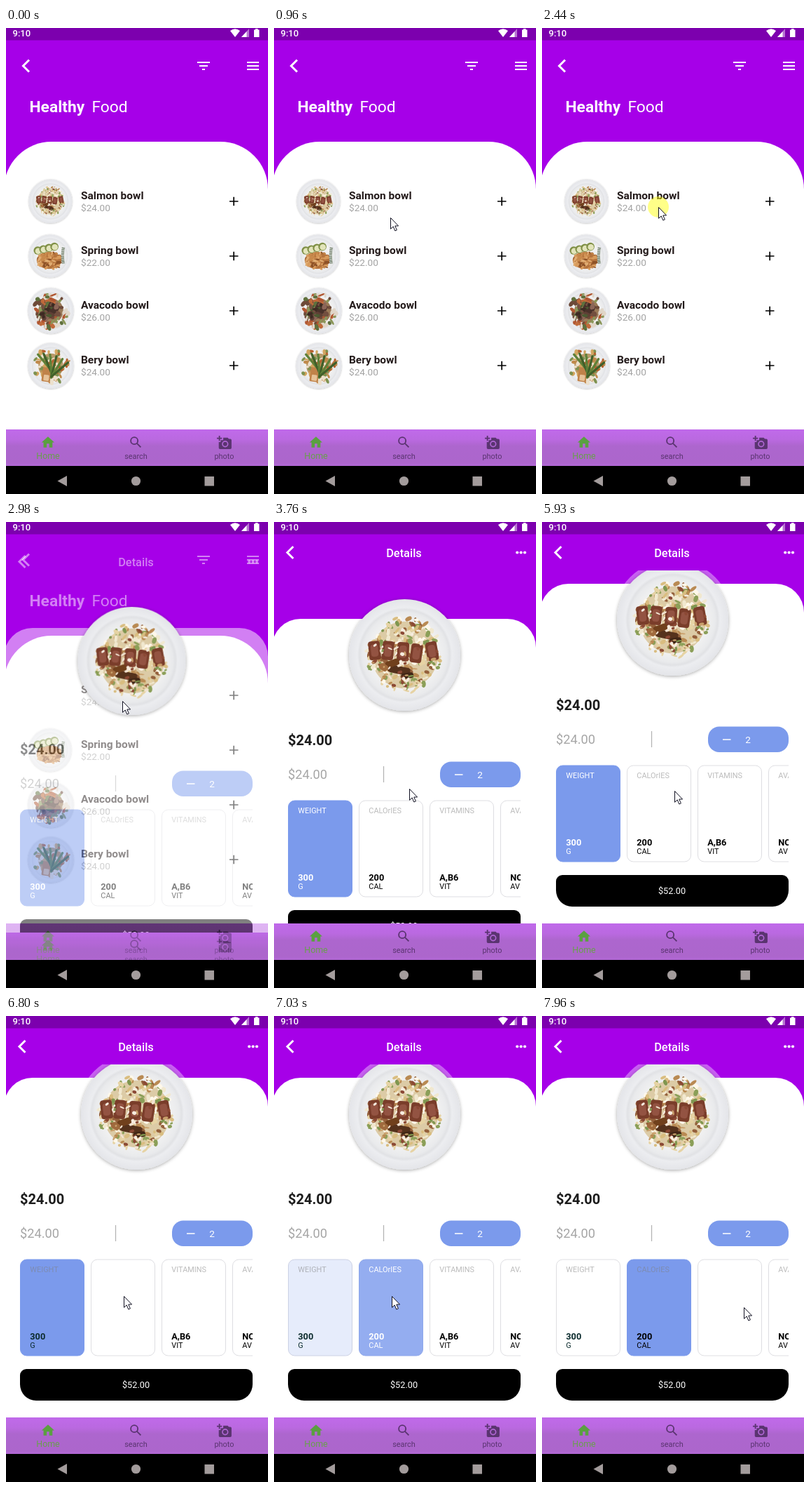
An HTML page that plays this animation: 374 px wide and 664 px high, repeating every 8 s.

```html
<!DOCTYPE html>
<html lang="en">
<head>
<meta charset="utf-8">
<title>Food menu</title>
<style>
html, body { margin: 0; width: 100%; height: 100%; overflow: hidden; background: #a600e8 }
svg { display: block; width: 100vw; height: 100vh; font-family: Roboto, sans-serif }
.line { fill: none; stroke: currentColor; stroke-width: 2 }
.thick { stroke-width: 3 }
.thin { stroke-width: 1.7 }
.bold { font-weight: 700 }
.medium { font-weight: 500 }
.mid { text-anchor: middle }
.white { fill: #fff; color: #fff }
.card { fill: #80808088; color: #000; font-size: 10.92px }
.card .val { fill: currentColor }
.box { fill: #fff; stroke: #dedee2 }

#details, #thumb0, #hero, #halo, .card, #tap { animation: 8s step-end infinite }
#details { animation-name: enter }
#thumb0 { animation-name: leave }
#hero { animation-name: fly }
#halo { animation-name: halo }
.scroll { animation: scroll 8s linear infinite }
#card0 { animation-name: ink0 }
#card1 { animation-name: ink1 }
#card2 { animation-name: ink2 }
#card0 .box { animation: fade0 8s linear infinite }
#card1 .box { animation: fade1 8s linear infinite }
#cursor { animation: point 8s linear infinite }
#tap { animation-name: tap }

@keyframes enter {
  0% { opacity: 0; transform: translateY(13px) }
  37.25% { opacity: .5; transform: translateY(13px) }
  38.375% { opacity: .93; transform: translateY(1px) }
  39.375%, 100% { opacity: 1; transform: none }
}
@keyframes leave { 0% { opacity: 1 } 37.25%, 100% { opacity: 0 } }
@keyframes fly {
  0% { opacity: 0; transform: translate(-7px, 8.5px) scale(.97) }
  37.25% { opacity: 1; transform: translate(-7px, 8.5px) scale(.97) }
  38.375% { opacity: 1; transform: translate(-.5px, .6px) }
  39.375%, 100% { opacity: 1; transform: none }
}
@keyframes halo { 0% { opacity: 0 } 52.75%, 100% { opacity: .38 } }
@keyframes scroll {
  0% { transform: none }
  52.75% { transform: none; animation-timing-function: steps(3, jump-start) }
  55.5625%, 100% { transform: translateY(-50px) }
}
@keyframes ink0 {
  0% { fill: #fff; color: #fff }
  84%, 100% { fill: #80808088; color: #0c2c2e }
}
@keyframes ink1 {
  0%, 97.75%, 100% { fill: #80808088; color: #000 }
  84% { fill: #fff; color: #fff }
}
@keyframes ink2 {
  0% { fill: #80808088; color: #000 }
  97.75%, 100% { fill: #fff; color: #fff }
}
@keyframes fade0 {
  0%, 85.75% { fill: #7b9aec; stroke: #7b9aec }
  88.375%, 100% { fill: #fff; stroke: #dedee2 }
}
@keyframes fade1 {
  0%, 85.75% { fill: #fff; stroke: #dedee2 }
  88.375%, 100% { fill: #7b9aec; stroke: #7b9aec }
}
@keyframes point {
  0%, 2.99% { opacity: 0; transform: translate(255px, 478px) }
  3% { opacity: 1; transform: translate(255px, 478px); animation-timing-function: steps(10, jump-none) }
  13% { transform: translate(166px, 270px) }
  24.75% { transform: translate(166px, 270px); animation-timing-function: steps(3, jump-start) }
  27.75% { transform: translate(166px, 255px) }
  46% { transform: translate(166px, 255px); animation-timing-function: steps(2, jump-start) }
  48% { transform: translate(193px, 380px); animation-timing-function: step-end }
  74.125% { transform: translate(189px, 383px); animation-timing-function: step-end }
  75.125% { transform: translate(181px, 389px); animation-timing-function: step-end }
  76.125% { transform: translate(173px, 395px); animation-timing-function: step-end }
  77.125% { transform: translate(168px, 399px) }
  89% { transform: translate(168px, 399px); animation-timing-function: steps(5, jump-start) }
  93.6875%, 100% { opacity: 1; transform: translate(288px, 415px) }
}
@keyframes tap {
  0%, 32.5%, 82.125%, 97.75%, 100% { opacity: 0 }
  30.5%, 79.25%, 95.625% { opacity: .47 }
}
</style>
</head>
<body>
<svg viewBox="0 0 374 664" preserveAspectRatio="none">
  <defs>
    <linearGradient id="barFill" x2="0" y2="1">
      <stop stop-color="#c06aea"/><stop offset=".28" stop-color="#ba69e0"/>
      <stop offset=".45" stop-color="#ad66ce"/><stop offset=".9" stop-color="#ac66cc"/>
      <stop offset="1" stop-color="#b268d6"/>
    </linearGradient>
    <radialGradient id="china">
      <stop offset=".6" stop-color="#f1f1f1"/><stop offset=".76" stop-color="#e9eaec"/>
      <stop offset=".81" stop-color="#e1e2e5"/><stop offset=".85" stop-color="#ecedf0"/>
      <stop offset="1" stop-color="#e4e5e9"/>
    </radialGradient>
    <filter id="shade" x="-20%" y="-20%" width="140%" height="140%">
      <feDropShadow dx="0" dy="1" stdDeviation="2.5" flood-opacity=".35"/>
    </filter>
    <filter id="soft" x="-20%" y="-20%" width="140%" height="140%">
      <feDropShadow dx="0" dy=".4" stdDeviation=".8" flood-opacity=".3"/>
    </filter>
    <clipPath id="view"><path d="M0 69H374V572H0z"/></clipPath>
    <clipPath id="strip"><path d="M0 380H352V545H0z"/></clipPath>
    <g id="bar">
      <path d="M0 572H374V624H0z" fill="url(#barFill)"/>
      <path d="M10 20v-6h4v6h5v-8h3L12 3 2 12h3v8z" transform="translate(49 579.5) scale(.91)" fill="#5aa040"/>
      <text x="60" y="613.5" class="mid" font-size="12.4" fill="#69a04c">Home</text>
      <g fill="#5a3470" color="#5a3470" font-size="10.92" class="mid">
        <g class="line" transform="translate(174.5 579.5) scale(.91)">
          <circle cx="9.5" cy="9.5" r="5.5"/><path d="M13.6 13.6 19.7 19.7"/>
        </g>
        <g transform="translate(301 580) scale(.91)">
          <path d="M3 4V1h2v3h3v2H5v3H3V6H0V4zM10 4h7l1.8 2H21a2 2 0 0 1 2 2v12a2 2 0 0 1-2 2H5a2 2 0 0 1-2-2V11h3V8h4z"/>
          <circle cx="13" cy="14" r="4.2" fill="none" stroke="#b267d6" stroke-width="1.8"/>
        </g>
        <text x="185.5" y="613.5">search</text><text x="311.5" y="613.5">photo</text>
      </g>
    </g>
  </defs>

  <g id="list">
    <path d="M0 0H374V664H0z" fill="#a600e8"/>
    <g class="white">
      <path class="line thick" d="M33 45.5 24.5 54 33 62.5"/>
      <path class="line" d="M273 49h18M276 54h12M280 59h4M344 49h17M344 54h17M344 59h17"/>
      <g font-size="22.8">
        <text x="33.5" y="120" class="bold">Healthy</text><text x="122.5" y="120">Food</text>
      </g>
    </g>
    <path d="M-3 664V230a68 68 0 0 1 68-68H306a68 68 0 0 1 68 68V664z" fill="#fff"/>
    <g id="rows"></g>
    <use href="#bar"/>
  </g>

  <g id="details">
    <path d="M0 0H374V664H0z" fill="#a600e8"/>
    <g class="white">
      <path class="line thick" d="M27.5 35 19 43.5 27.5 52"/>
      <text x="185.5" y="49.5" font-size="16.4" class="mid medium">Details</text>
      <circle cx="347.2" cy="43.5" r="2.1"/><circle cx="352.6" cy="43.5" r="2.1"/><circle cx="358" cy="43.5" r="2.1"/>
    </g>
    <g clip-path="url(#view)">
      <g class="scroll">
        <path d="M-3 700V179a41 41 0 0 1 41-41H333a41 41 0 0 1 41 41V700z" fill="#fff"/>
        <text x="20" y="317.5" font-size="20" class="bold" fill="#1c1c1c">$24.00</text>
        <text x="20" y="366" font-size="18.2" fill="#a6a6a6">$24.00</text>
        <path d="M156.5 348V371" stroke="#b4b4b4" stroke-width="1.3"/>
        <rect x="237" y="341.5" width="115" height="36.5" rx="16" fill="#7b9aec"/>
        <path d="M258 360h11.5" stroke="#fff" stroke-width="1.5"/>
        <text x="294" y="364.5" font-size="13.65" class="mid white">2</text>
        <g id="cards" clip-path="url(#strip)"></g>
        <path d="M29 553H343a9 9 0 0 1 9 9v13a23 23 0 0 1-23 23H43a23 23 0 0 1-23-23v-13a9 9 0 0 1 9-9z"/>
        <text x="185.5" y="580" font-size="12.74" class="mid white">$52.00</text>
      </g>
    </g>
    <use href="#bar"/>
  </g>

  <g clip-path="url(#view)">
    <g class="scroll">
      <circle id="halo" cx="186.5" cy="189.5" r="86" fill="#fff"/>
      <g id="hero" style="transform-origin:186.5px 189.5px"></g>
    </g>
  </g>

  <path d="M0 0H374V17.5H0z" fill="#7c00ae"/>
  <g class="white">
    <text x="9.5" y="11.7" font-size="13" class="medium">9:10</text>
    <path d="M320 4Q327-1.5 334 4L327 13z"/>
    <path d="M347 1V13H336z" opacity=".45"/><path d="M343.5 5V13H336z"/>
    <path d="M354 2.5h2V1h3.5v1.5h2V13H354z"/>
  </g>
  <path d="M0 624H374V664H0z"/>
  <g fill="#a39c9c">
    <path d="M73.5 645.5 87 638V653z"/><circle cx="185.5" cy="645.5" r="6.6"/>
    <path d="M283.5 639H297V652.5H283.5z"/>
  </g>

  <g id="cursor">
    <circle id="tap" r="15" fill="#ff0"/>
    <path d="M.5 .5V16.3L4.2 12.9 6.8 19 9.4 17.9 6.8 12H11.6z" fill="#fff" stroke="#111122"/>
  </g>
</svg>
<script>
const $ = id => document.getElementById(id);

function random(seed) {
  return () => (seed = seed * 16807 % 2147483647) / 2147483647;
}

// Seeded crumbs inside a disc.
function crumbs(seed, count, colours, size, scale = 1) {
  const rnd = random(seed * 7919);
  let out = '';
  for (let i = 0; i < count; i++) {
    const a = rnd() * 6.283, d = Math.sqrt(rnd()) * size * 1.04;
    const w = (.03 + rnd() * .06) * scale, h = (.02 + rnd() * .035) * scale;
    out += `<ellipse rx="${w}" ry="${h}" fill="${colours[i % colours.length]}" transform="translate(${d * Math.cos(a)} ${d * Math.sin(a)}) rotate(${rnd() * 180})"/>`;
  }
  return out;
}

const dish = (x, y, r, food) =>
  `<g transform="translate(${x} ${y}) scale(${r})"><circle r="1" fill="url(#china)"/>${food}</g>`;

const slab = (x, y, w, h, turn, fill) =>
  `<rect x="${-w / 2}" y="${-h / 2}" width="${w}" height="${h}" rx=".05" fill="${fill}" transform="translate(${x} ${y}) rotate(${turn})"/>`;

const rice = ['#f1e8cf', '#d9bd80', '#8b9f58', '#fff8ea', '#94603a', '#e6d3a4', '#b98a52'];
const tuna = '<circle r=".6" fill="#dccba6"/>' + crumbs(7, 240, rice, .65, .8)
  + [[-.54, -.08, -6], [-.3, -.08, 5], [-.03, -.06, 4], [.21, -.03, 8], [.49, -.07, -10]]
    .map(([x, y, a]) => slab(x, y, .21, .34, a, '#7a3d2c') + slab(x, y, .13, .22, a, '#935342')).join('')
  + slab(-.1, .27, .4, .14, 12, '#54301d') + slab(-.22, .15, .26, .12, -20, '#70401f')
  + slab(.05, .37, .22, .1, -8, '#402616') + slab(-.38, .22, .16, .12, 30, '#a06a3c')
  + crumbs(13, 60, ['#f6ecdf', '#c9a06c', '#f3e4d2', '#7f9650', '#8b4a34'], .58, .6);

const limes = '<ellipse cx="-.05" cy=".2" rx=".58" ry=".4" fill="#b5733c"/>'
  + `<g transform="translate(-.05 .2) scale(1 .72)">${crumbs(23, 80, ['#c98a4d', '#e0ac72', '#8d5128', '#d79a5c'], .56, 1.6)}</g>`
  + [-.58, -.32, -.06, .2].map((x, i) =>
    `<circle cx="${x}" cy="${-.26 - i * .06}" r=".19" fill="#7f8f45"/><circle cx="${x + .02}" cy="${-.24 - i * .06}" r=".14" fill="#e2e4ba"/>`).join('')
  + '<path d="M.62-.4Q.55 0 .62 .35" fill="none" stroke="#71806a" stroke-width=".14" stroke-dasharray=".05 .03"/>';

const steak = '<circle r=".55" fill="#9a7a58"/>'
  + crumbs(37, 70, ['#c06a3a', '#5f6f3c', '#b05630', '#e0d6c8', '#6d4a38', '#8a9658'], .72, 1.9)
  + slab(-.1, .12, .7, .42, -22, '#5f3f35') + slab(.1, -.12, .5, .4, 25, '#4a302c')
  + crumbs(41, 24, ['#8c6659', '#4b5a30', '#73503f', '#3c2a24'], .4, 1.6);

const greens = '<circle r=".55" fill="#b89a6a"/>'
  + crumbs(51, 80, ['#c08a4c', '#7d9150', '#b4602f', '#ece0cc', '#d3a55f'], .74, 1.6)
  + slab(-.2, .38, .36, .62, 8, '#c0824a') + slab(-.2, .52, .24, .26, 8, '#e6c298')
  + [-40, -22, -4, 14, 32, 50].map((a, i) => slab(-.26 + i * .13, -.14 + i * .06, .1, 1.05, a, i % 2 ? '#41602c' : '#5f8038')).join('');

const thumbs = [dish(63.5, 247, 31, tuna), dish(63, 325, 30.5, limes), dish(64, 403, 32.5, steak), dish(64, 481.5, 32.5, greens)];

$('rows').innerHTML = [['Salmon', 24], ['Spring', 22], ['Avacodo', 26], ['Bery', 24]].map(([name, price], i) => {
  const y = 247 + i * 78;
  return `<g id="thumb${i}" filter="url(#soft)">${thumbs[i]}</g>
    <text x="107" y="${y - 3}" font-size="15.47" class="bold" fill="#231a1a">${name} bowl</text>
    <text x="107" y="${y + 14}" font-size="13.65" fill="#a3a3a3">$${price}.00</text>
    <path class="line thin" d="M319 ${y}h12.5M325.2 ${y - 6.2}v12.5"/>`;
}).join('');

$('cards').innerHTML = [['WEIGHT', '300', 'G'], ['CALOrIES', '200', 'CAL'], ['VITAMINS', 'A,B6', 'VIT'], ['AVAIL', 'NO', 'AV']]
  .map(([label, value, unit], i) => {
    const x = 20 + i * 101;
    return `<g id="card${i}" class="card">
      <rect class="box" x="${x + .5}" y="397" width="91" height="137" rx="9"/>
      <text x="${x + 14.3}" y="414.5">${label}</text>
      <g class="val"><text x="${x + 14.3}" y="510.5" font-size="12.74" class="bold">${value}</text>
      <text x="${x + 14.3}" y="523">${unit}</text></g></g>`;
  }).join('');

$('hero').innerHTML = `<g filter="url(#shade)">${dish(186.5, 189.5, 79.5, tuna)}</g>`;
</script>
</body>
</html>
```
